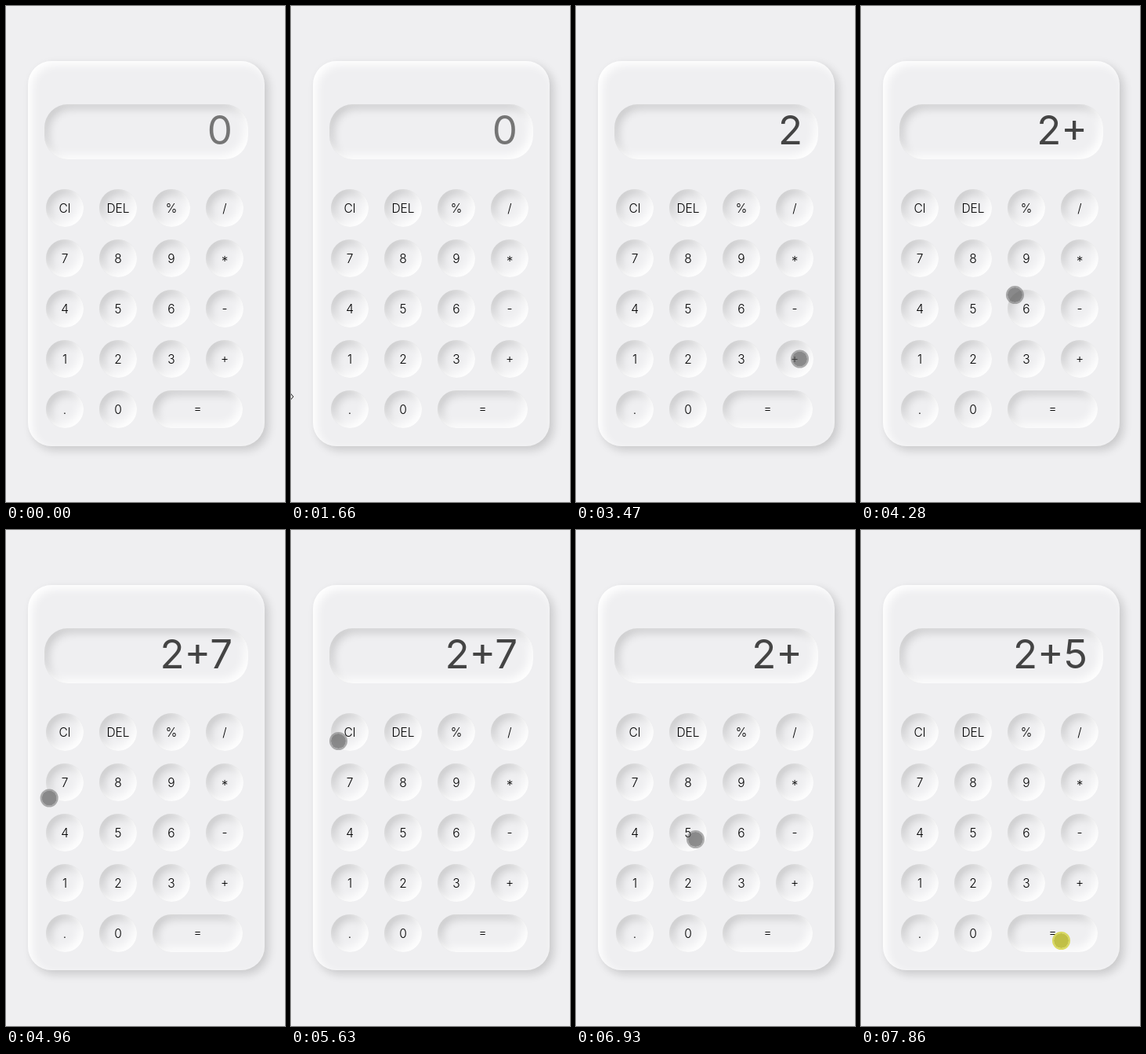
Write an HTML page that moves like this. It is 356 px wide and 631 px high and loops after 8 s.

```html
<!DOCTYPE html>
<html lang="en">
<head>
<meta charset="utf-8">
<title>Soft calculator</title>
<style>
  html, body { margin: 0; width: 100%; height: 100%; overflow: hidden; background: #efeff1; }
  body { position: relative; font-family: Inter, "Open Sans", sans-serif; font-feature-settings: "case"; color: #000; }
  .case, .screen, .key { position: absolute; box-sizing: border-box; }
  .case {
    left: 28px; top: 70px; width: 302px; height: 490px; border-radius: 30px;
    box-shadow: inset 5px 5px 12px #fff, 5px 5px 12px rgba(0, 0, 0, .16);
  }
  .screen, .key { box-shadow: inset -5px -5px 12px #fff, inset 5px 5px 12px rgba(0, 0, 0, .16); }
  .screen { left: 49px; top: 125px; width: 260px; height: 70px; border-radius: 30px; }
  .key {
    width: 48px; height: 48px; border-radius: 24px;
    font-size: 15.5px; font-weight: 300; line-height: 49px; text-align: center;
  }
  .key.wide { width: 115px; }
  svg { position: absolute; left: 0; top: 0; z-index: 1; }
  #value { font-size: 51px; text-anchor: end; }
  #dot { --fill: rgba(88, 88, 88, .68); --ring: rgba(110, 110, 110, .55); }
  #dot.down { --fill: rgba(176, 175, 12, .75); --ring: rgba(207, 207, 33, .7); }
  .core { fill: var(--fill); }
  .rim { fill: none; stroke: var(--ring); stroke-width: 2; }
</style>
</head>
<body>
<div class="case"></div>
<div class="screen"></div>
<svg width="356" height="631" viewBox="0 0 356 631">
  <text id="value" x="289" y="176"></text>
  <path id="edge" d="M-1 492.5L3 497L-1 501.5" fill="#fff" stroke="#111"/>
  <g id="dot">
    <circle class="core" r="9.5"/>
    <circle class="rim" r="10.5"/>
  </g>
</svg>
<script>
const LOOP = 8000, TICK = 1000 / 15, LAG = 12;
const $ = id => document.getElementById(id);

const rows = ["Cl DEL % /", "7 8 9 *", "4 5 6 -", "1 2 3 +", ". 0 ="];
rows.forEach((row, r) => row.split(" ").forEach((label, c) => {
  const key = document.createElement("div");
  key.className = label === "=" ? "key wide" : "key";
  key.textContent = label;
  key.style.left = 51 + 68 * c + "px";
  key.style.top = 233 + 64 * r + "px";
  document.body.append(key);
}));

const linear = p => p;
const speedUp = p => p ** 3;
const slowDown = p => 1 - (1 - p) ** 2;
const smooth = p => p * p * (3 - 2 * p);

const away = [-50, -50];
const two = [147.5, 461.5], plus = [285.5, 449], seven = [70, 331],
  clear = [60.5, 268.5], del = [160, 259], nearFive = [152.5, 393.5],
  five = [154, 386], equals = [255.5, 522.5];

// Pointer strokes: start tick, end tick, easing, from, to, optional bend.
const strokes = [
  [0, 0, linear, away, away],
  [5, 8, linear, [248, 639], [-42, 540]],
  [25, 30, slowDown, [-40, 497], two],
  [38, 40, speedUp, two, [400, 462]],
  [43, 51, slowDown, [343.5, 451.5], plus],
  [59, 68, smooth, plus, seven, [253, 364]],
  [73, 77, smooth, seven, [-25, 395]],
  [80, 84, linear, [5, 445], clear],
  [85, 92, smooth, clear, del, [300, 228]],
  [97, 104, smooth, del, nearFive, [-31, 700]],
  [104, 105, linear, nearFive, five],
  [108, 118, smooth, five, equals, [200, 610]]
];

// Presses: tick down, tick up, key.
const presses = [[33, 35, "2"], [58, 59, "+"], [72, 73, "7"],
  [96, 97, "DEL"], [106, 108, "5"], [118, 121, "="]];

function place(tick) {
  const [start, end, ease, from, to, bend] = strokes.findLast(s => s[0] <= tick);
  const p = tick < end ? ease((tick - start) / (end - start)) : 1;
  return from.map((a, i) => {
    const b = to[i], mid = bend ? bend[i] : (a + b) / 2;
    return (1 - p) ** 2 * a + 2 * p * (1 - p) * mid + p * p * b;
  });
}

const type = (text, [, , key]) => key === "DEL" ? text.slice(0, -1) : text + key;

function draw(time) {
  const tick = Math.floor((time % LOOP + LAG) / TICK);
  const text = presses.filter(p => p[1] <= tick).reduce(type, "");
  $("value").textContent = text || "0";
  $("value").setAttribute("fill", text ? "#444" : "#757575");
  $("edge").style.display = tick === 25 ? "" : "none";
  $("dot").setAttribute("transform", `translate(${place(tick)})`);
  $("dot").classList.toggle("down", presses.some(([a, b]) => tick >= a && tick < b));
}

const start = performance.now();
function frame() {
  draw(performance.now() - start);
  requestAnimationFrame(frame);
}
frame();
</script>
</body>
</html>
```
